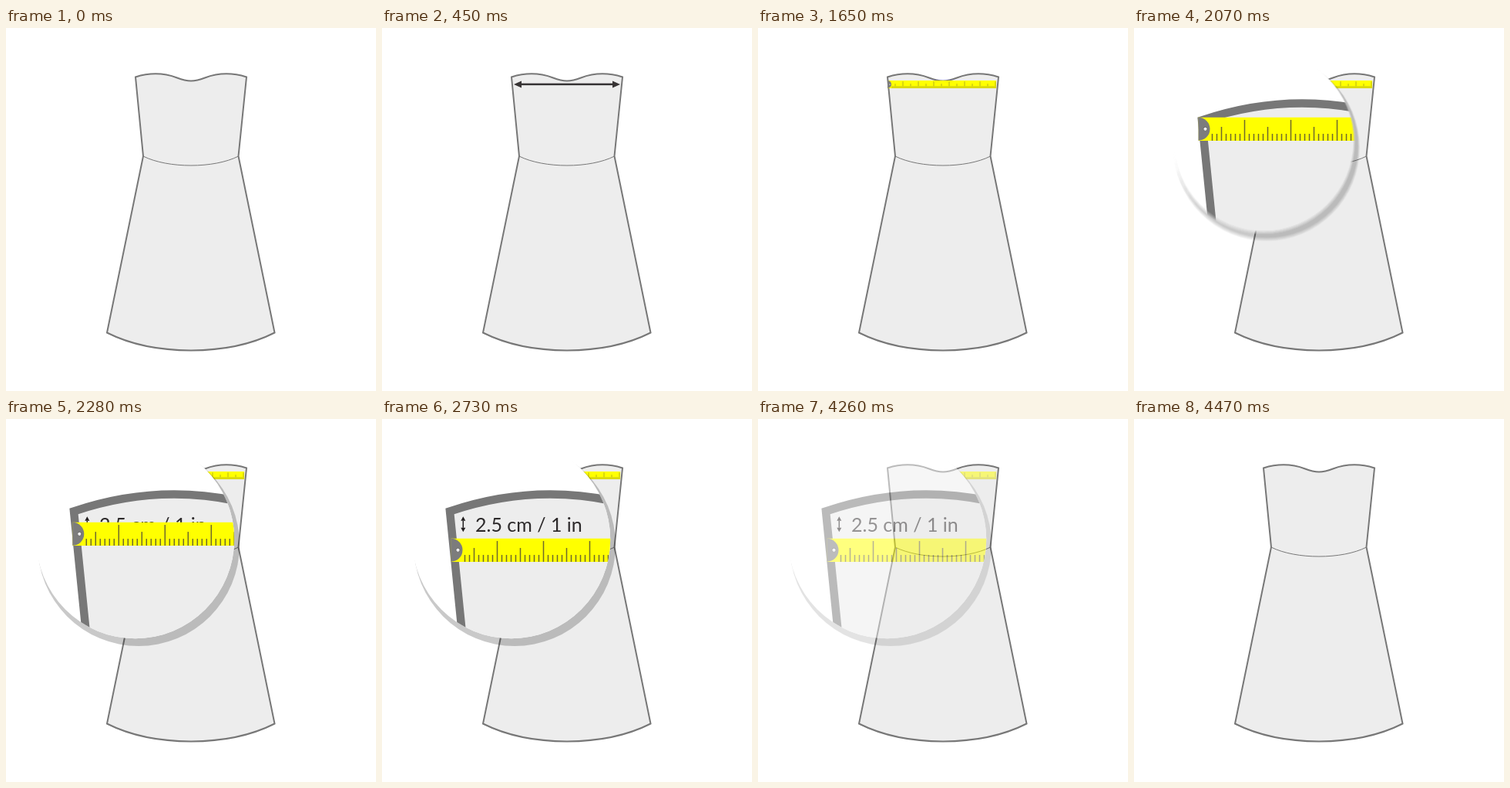
Animation, 480 px wide and 470 px high, one loop 4.5 s. Source, as an HTML page with a canvas:

```html
<!DOCTYPE html>
<html lang="en">
<head>
<meta charset="utf-8">
<title>Measuring a dress</title>
<style>
  html, body { margin: 0; width: 100%; height: 100%; overflow: hidden; background: #fff; }
  canvas { display: block; }
</style>
</head>
<body>
<canvas id="stage" width="480" height="470"></canvas>
<script>
const W = 480, H = 470, LOOP = 4500, STEP = 30;
const GRAY = '#777', FABRIC = '#ededed', INK = '#231f20', YELLOW = '#ff0';

const stage = document.getElementById('stage').getContext('2d');
const buffer = document.createElement('canvas');
buffer.width = W;
buffer.height = H;
const ctx = buffer.getContext('2d');

// Start and end of each part, in ms
const TIMES = {
  arrow: [0, 650],
  wipe: [780, 1680],
  lens: [1830, 2170],
  slide: [2100, 2760],
  fade: [4050, 4470]
};

const progress = (t, [a, b]) => Math.min(1, Math.max(0, (t - a) / (b - a)));
const easeOut = p => 1 - (1 - p) ** 2;

function bezier(x1, y1, x2, y2) {
  const at = (s, a, b) => 3 * a * s * (1 - s) ** 2 + 3 * b * s * s * (1 - s) + s ** 3;
  return p => {
    if (p <= 0 || p >= 1) return p;
    let lo = 0, hi = 1;
    for (let i = 0; i < 24; i++) {
      const mid = (lo + hi) / 2;
      if (at(mid, x1, x2) < p) lo = mid; else hi = mid;
    }
    return at(lo, y1, y2);
  };
}
const easeSlide = bezier(.33, 0, .1, 1);
const easeFade = bezier(.33, 0, .67, 1);

const dressPath = new Path2D(
  'M168 63.5 C187 57.5 206 58.5 222 64.5 C229 67.2 234 68.5 240 68.5 ' +
  'C246 68.5 251 67.2 258 64.5 C274 58.5 293 57.5 312 63.5 ' +
  'L301.5 166 L348.5 394.5 C288 425 192 425 131 394.5 L178 166 Z');
const waistPath = new Path2D('M178 166 C210 182 270 182 301.5 166');
const cornerPath = new Path2D('M113 367 L88 119.5 Q209 78.6 330 113.8 L330 367 Z');

function paint(path, width) {
  ctx.fillStyle = FABRIC;
  ctx.fill(path);
  ctx.strokeStyle = GRAY;
  ctx.lineWidth = width;
  ctx.stroke(path);
}

function circle(x, y, r) {
  ctx.beginPath();
  ctx.arc(x, y, r, 0, Math.PI * 2);
}

function drawDress() {
  ctx.fillStyle = '#fff';
  ctx.fillRect(0, 0, W, H);
  paint(dressPath, 2);
  ctx.lineWidth = 1;
  ctx.stroke(waistPath);
}

// Horizontal double arrow centred on the current origin
function drawArrow(half, line, headLength, headHalf) {
  ctx.fillStyle = INK;
  ctx.fillRect(headLength - half, -line / 2, 2 * (half - headLength), line);
  for (const side of [-1, 1]) {
    ctx.beginPath();
    ctx.moveTo(side * half, 0);
    ctx.lineTo(side * (half - headLength), -headHalf);
    ctx.lineTo(side * (half - headLength), headHalf);
    ctx.fill();
  }
}

function drawTape(x, y, scale, length) {
  const height = 30.5;
  ctx.save();
  ctx.translate(x, y);
  ctx.scale(scale, scale);
  ctx.beginPath();
  ctx.rect(0, 0, length, height);
  ctx.clip();
  ctx.fillStyle = YELLOW;
  ctx.fillRect(0, 0, length, height);
  ctx.fillStyle = '#6f6a2c';
  for (let i = 3; i * 6 <= length; i++) {
    const tick = i % 10 === 0 ? 27 : i % 5 === 0 ? 18 : 9;
    ctx.fillRect(i * 6 - .75, height - tick, 1.5, tick);
  }
  ctx.fillStyle = '#7c7c7c';
  circle(0, height / 2, 15);
  ctx.fill();
  ctx.fillStyle = '#eee';
  circle(9, height / 2, 2.6);
  ctx.fill();
  ctx.strokeStyle = '#666';
  ctx.lineWidth = 1;
  ctx.stroke();
  ctx.restore();
}

function drawLens(size, slide) {
  const grow = (x, y, r) => circle(172 + (x - 172) * size, 58 + (y - 58) * size, r * size);
  ctx.save();
  grow(172, 163, 131);
  ctx.fillStyle = 'rgba(0,0,0,.21)';
  ctx.fill();
  grow(167.7, 155.7, 128.5);
  ctx.fillStyle = '#fff';
  ctx.fill();
  ctx.clip();
  paint(cornerPath, 10.5);
  if (slide > 0) {
    ctx.save();
    ctx.translate(105.3, 136.3);
    ctx.rotate(Math.PI / 2);
    drawArrow(10, 1.5, 5.5, 3);
    ctx.restore();
    ctx.fillStyle = '#2d2a2b';
    ctx.font = '25px Lato, sans-serif';
    ctx.fillText('2.5 cm / 1 in', 121, 145.5);
  }
  drawTape(83.5 + 6 * slide, 115.5 + 39 * slide, 1, 240);
  ctx.restore();
}

function drawScene(t) {
  drawDress();
  const wipe = easeOut(progress(t, TIMES.wipe));
  if (wipe < 1) {
    ctx.save();
    ctx.globalAlpha = easeOut(progress(t, TIMES.arrow));
    ctx.translate(240, 72.9);
    drawArrow(69, 2.5, 10, 4.5);
    ctx.restore();
  }
  if (wipe > 0) drawTape(168, 68, 1 / 3, 424 * wipe);

  const size = easeOut(progress(t, TIMES.lens));
  if (size > 0) drawLens(size, easeSlide(progress(t, TIMES.slide)));

  const fade = easeFade(progress(t, TIMES.fade));
  if (fade > 0) {
    // Blend the finished picture back to the bare dress
    const overlay = document.createElement('canvas');
    overlay.width = W;
    overlay.height = H;
    overlay.getContext('2d').drawImage(buffer, 0, 0);
    drawDress();
    ctx.globalAlpha = 1 - fade;
    ctx.drawImage(overlay, 0, 0);
    ctx.globalAlpha = 1;
  }
}

function render(t) {
  // The fast growth of the lens has a motion blur over half a step
  const [from, to] = TIMES.lens;
  const samples = t > from && t < to ? 6 : 1;
  for (let i = 0; i < samples; i++) {
    drawScene(t + ((i + .5) / samples - .5) * STEP / 2);
    stage.globalAlpha = 1 / (i + 1);
    stage.drawImage(buffer, 0, 0);
  }
}

const start = performance.now();
function tick() {
  const t = (performance.now() - start) % LOOP;
  render(Math.floor(t / STEP) * STEP);
  requestAnimationFrame(tick);
}
tick();
</script>
</body>
</html>
```
